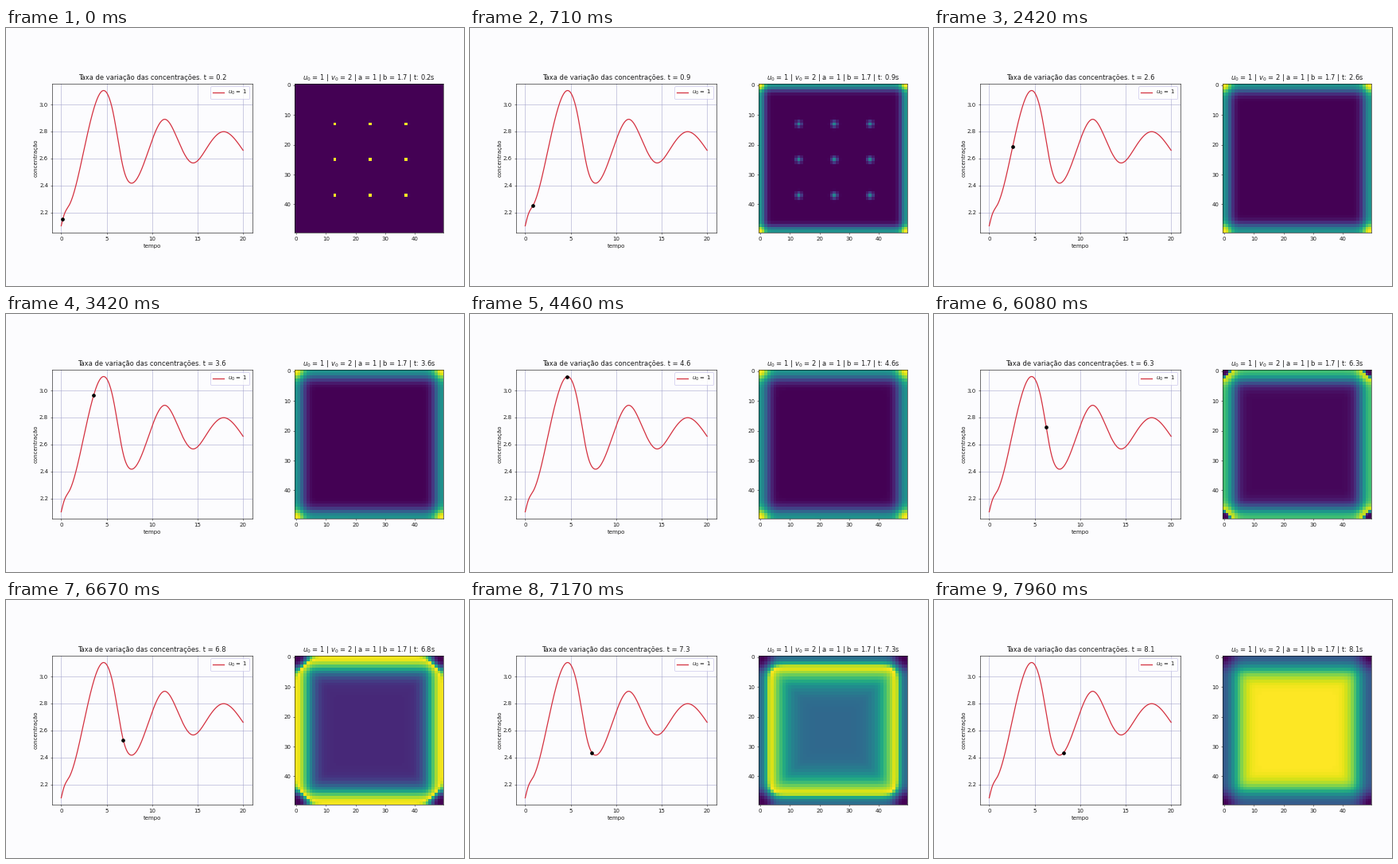
Recreate the animation shown at these times as a matplotlib script. Size 576 by 324 pixels, loop 8 s.

```python
import numpy as np
import matplotlib.pyplot as plt
from matplotlib.animation import FuncAnimation

W, H, DPI = 576, 324, 50
FRAMES, STEP_MS = 200, 40
T_START = 0.18
N = 50
PAPER, INK, RED, GRID = "#fcfcfe", "#1c1c1c", "#d4303f", "#a4a4cc"

# Turning points of the concentration curve: time, value
KNOTS = np.array([
    (0, 2.1), (0.3, 2.178), (0.9, 2.256), (2.58, 2.687), (4.7, 3.103),
    (5.7, 2.943), (6.82, 2.53), (7.65, 2.417), (9.5, 2.64), (11.4, 2.89),
    (13, 2.71), (14.4, 2.567), (16.1, 2.687), (17.8, 2.798), (20, 2.66)])


def spline(knots):
    """Natural cubic spline through the knots."""
    x, y = knots.T
    h, d = np.diff(x), np.diff(y) / np.diff(x)
    n = len(x)
    a, r = np.eye(n), np.zeros(n)
    for i in range(1, n - 1):
        a[i, i - 1:i + 2] = h[i - 1], 2 * (h[i - 1] + h[i]), h[i]
        r[i] = 6 * (d[i] - d[i - 1])
    m = np.linalg.solve(a, r)

    def value(t):
        i = np.clip(np.searchsorted(x, t) - 1, 0, n - 2)
        s = t - x[i]
        slope = d[i] - h[i] * (2 * m[i] + m[i + 1]) / 6
        return y[i] + s * (slope + s * (m[i] / 2 + s * (m[i + 1] - m[i]) / (6 * h[i])))

    return value


curve = spline(KNOTS)

cells = np.arange(N)
depth = np.minimum(cells, N - 1 - cells)
seed_gap = np.min([np.abs(cells - c) for c in (13, 25, 37)], axis=0)
seed_dist2 = seed_gap[:, None] ** 2 + seed_gap ** 2


def field(t):
    """Seeds fade while a wave soaks in from the border, then its crest runs inward."""
    edge = np.exp(-(depth / (1.95 * t ** 0.3)) ** 2)
    lead = np.sqrt(edge[:, None] + edge)
    far = np.sqrt(2)

    k = np.clip((t - 5.6) / 2.5, 0, 1)
    crest = max(far * (1 - k ** 1.7), 1e-6)
    base = k ** 3
    rise = base + (1 - base) * np.minimum(lead / crest, 1) ** crest ** 2
    fall = np.clip((far - lead) / max(far - crest, 1e-6), 0, 1) ** (1 + crest)
    wave = np.where(lead <= crest, rise, fall)

    grow = np.clip((t - T_START) / 0.5, 0, 1) ** 2
    fade = np.exp(-((t - T_START) / 0.76) ** 2)
    seeds = fade * np.exp(-seed_dist2 / (1.2 * t))
    return np.clip(grow * wave + seeds, 0, 1)


def add_axes(fig, x0, y0, x1, y1):
    box = [x0 / W, 1 - y1 / H, (x1 - x0) / W, (y1 - y0) / H]
    return fig.add_axes(box, facecolor=PAPER)


plt.rcParams.update({"text.color": INK, "axes.labelcolor": INK,
                     "xtick.color": INK, "ytick.color": INK,
                     "axes.titlepad": 6.6})
fig = plt.figure(figsize=(W / DPI, H / DPI), dpi=DPI, facecolor=PAPER)

left = add_axes(fig, 58, 70, 309.6, 257)
ts = np.linspace(0, 20, 800)
left.plot(ts, curve(ts), color=RED, lw=1.8, label="$u_0$ = 1")
dot, = left.plot([], [], "o", color="black", ms=5.6, zorder=3)
left.set(xlim=(-1, 21), ylim=(2.0495, 3.1535), xlabel="tempo",
         xticks=range(0, 21, 5), yticks=np.arange(2.2, 3.1, 0.2))
left.set_ylabel("concentração", labelpad=2)
left.grid(color=GRID, lw=0.8)
left.legend(loc="upper right", edgecolor="#c0bce8")
left_title = left.set_title("")

right = add_axes(fig, 363, 70, 550, 257)
image = right.imshow(field(T_START), cmap="viridis", vmin=0, vmax=1,
                     interpolation="nearest", aspect="auto")
right.set(xticks=range(0, N, 10), yticks=range(0, N, 10))
right_title = right.set_title("")


def update(frame):
    t = T_START + frame * STEP_MS / 1000
    dot.set_data([t], [curve(t)])
    image.set_data(field(t))
    left_title.set_text(f"Taxa de variação das concentrações. t = {t:.1f}")
    right_title.set_text(f"$u_0$ = 1 | $v_0$ = 2 | a = 1 | b = 1.7 | t: {t:.1f}s")
    return dot, image, left_title, right_title


anim = FuncAnimation(fig, update, frames=FRAMES, interval=STEP_MS,
                     repeat=True, repeat_delay=0, blit=False)
plt.show()
```
